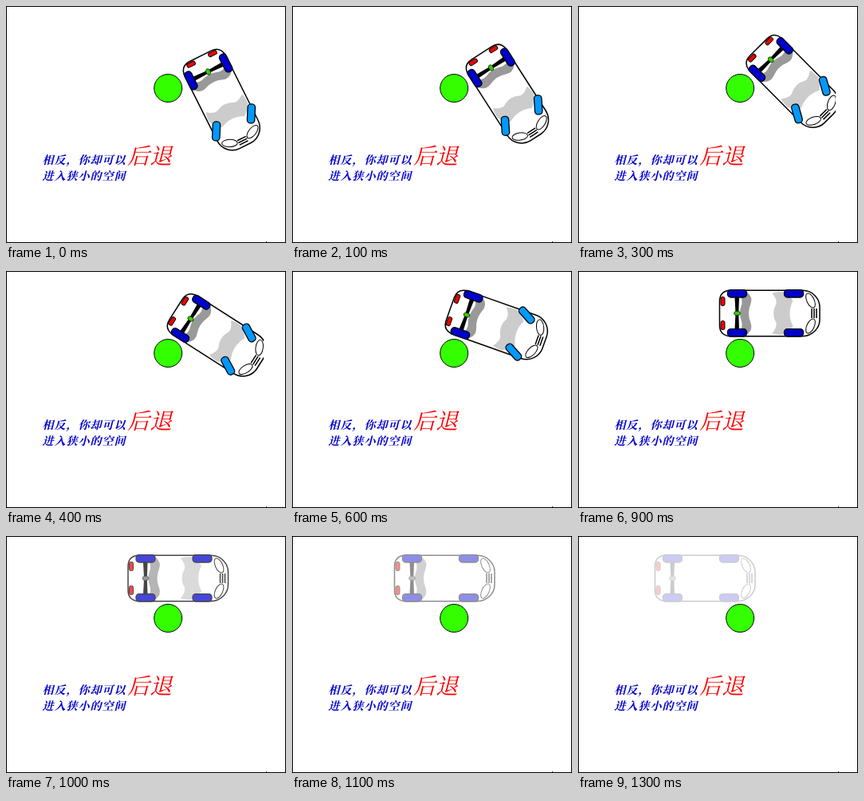
An HTML page that plays this animation: 351x297 px, repeating every 1400 ms.

```html
<!DOCTYPE html>
<html lang="zh-CN">
<head>
<meta charset="utf-8">
<style>
  html, body { margin: 0; width: 100%; height: 100%; overflow: hidden; background: #fff; }
  svg { display: block; width: 351px; height: 297px; }
  text { font-family: "Noto Serif CJK SC", "Noto Sans CJK SC", "Noto Sans CJK", serif; font-style: italic; }
  .note { font-size: 14px; font-weight: 700; letter-spacing: 1px; fill: #0000cc; }
  .big { font-size: 28px; font-weight: 400; fill: #f00; }
</style>
</head>
<body>
<svg viewBox="0 0 351 297">
  <defs>
    <clipPath id="stage"><path d="M0 0H323V297H0Z"/></clipPath>
    <rect id="wheel" x="-12" y="-4.7" width="24" height="9.4" rx="4" stroke="#000" stroke-width="1.3"/>
    <rect id="tail" x="-20.5" width="5" height="11" rx="2" fill="#f00" stroke="#000"/>
    <ellipse id="lamp" rx="4.6" ry="9.8" fill="#fff" stroke="#000"/>
  </defs>
  <rect width="351" height="297" fill="#fff"/>
  <text class="note" x="45.5" y="198">相反，你却可以</text>
  <text class="big" x="152" y="198">后退</text>
  <text class="note" x="45.5" y="218">进入狭小的空间</text>
  <circle cx="203.2" cy="103" r="17.5" fill="#3f0" stroke="#000"/>

  <g clip-path="url(#stage)">
    <!-- origin: middle of the rear axle, x points to the bonnet -->
    <g id="car">
      <path d="M-10 -28.7H82C95 -28.7 103.5 -18 103.5 -8V8C103.5 18 95 28.7 82 28.7H-10Q-22 27 -22 15V-15Q-22 -27 -10 -28.7Z"
            fill="#fff" stroke="#000" stroke-width="1.5"/>
      <path id="rearGlass" fill="#999"
            d="M3 -26H13Q20 -20 17 -12Q12 0 17 12Q20 20 13 26H3Q8 14 5 9Q2 0 5 -9Q8 -14 3 -26Z"/>
      <path id="frontGlass" fill="#ccc"
            d="M44 -25Q46 -27 57 -27Q66 -22 70 -16Q62 0 70 16Q66 22 57 27Q46 27 44 25Q50 18 49 12Q42 0 49 -12Q50 -18 44 -25Z"/>
      <use href="#tail" y="-20.5"/>
      <use href="#tail" y="9.5"/>
      <use href="#lamp" transform="translate(92 -16) rotate(-25)"/>
      <use href="#lamp" transform="translate(92 16) rotate(25)"/>
      <path d="M93.5 -6V6M96.5 -6V6M99.5 -6V6" stroke="#000" stroke-width="1.5"/>
      <path d="M-3 -20H2.5L1.8 0L2.5 20H-3L-2 0Z"/>
      <ellipse id="hub" rx="4" ry="2.7" stroke="#000" stroke-width=".6"/>
      <g fill="#0000cc">
        <use href="#wheel" y="-24.7"/>
        <use href="#wheel" y="24.3"/>
      </g>
      <g id="frontWheels">
        <use href="#wheel" class="steer" data-y="-24.7"/>
        <use href="#wheel" class="steer" data-y="24.3"/>
      </g>
    </g>
  </g>
  <path d="M326 295.5H327" stroke="#000"/>
  <rect x=".5" y=".5" width="350" height="296" fill="none" stroke="#000"/>
</svg>
<script>
const LOOP = 1400, STEP = 100;
// time, x, y, heading, opacity
const poses = [
  [0, 253.5, 82.5, 63.4, 1],
  [300, 241.7, 67.3, 45.2, 1],
  [400, 231.5, 60, 32.6, 1],
  [600, 219, 55, 19.5, 1],
  [900, 199.5, 53, 0, 1],
  [1100, 150.5, 53, 0, .44],
  [1300, 118.5, 53, 0, .2]
];
const $ = id => document.getElementById(id);

function poseAt(t) {
  const i = Math.max(1, poses.findIndex(p => p[0] >= t));
  const a = poses[i - 1], b = poses[i];
  const k = (t - a[0]) / (b[0] - a[0]);
  return a.map((v, j) => v + (b[j] - v) * k);
}

function draw(now) {
  const t = Math.floor(now % LOOP / STEP) * STEP;
  const [, x, y, heading, alpha] = poseAt(t);
  const turning = heading > 0;

  $('car').setAttribute('transform', `translate(${x} ${y}) rotate(${heading})`);
  $('car').setAttribute('opacity', alpha);
  $('frontWheels').setAttribute('fill', turning ? '#0099ff' : '#0000cc');
  for (const w of document.querySelectorAll('.steer'))
    w.setAttribute('transform', `translate(71 ${w.dataset.y}) rotate(${turning ? 29 : 0})`);
  $('hub').setAttribute('fill', alpha < 1 ? '#777' : '#3c0');
  $('frontGlass').setAttribute('opacity', alpha < .5 ? 0 : 1);
  $('rearGlass').setAttribute('opacity', alpha < .3 ? 0 : 1);
  requestAnimationFrame(() => draw(performance.now() - start));
}

const start = performance.now();
draw(0);
</script>
</body>
</html>
```
